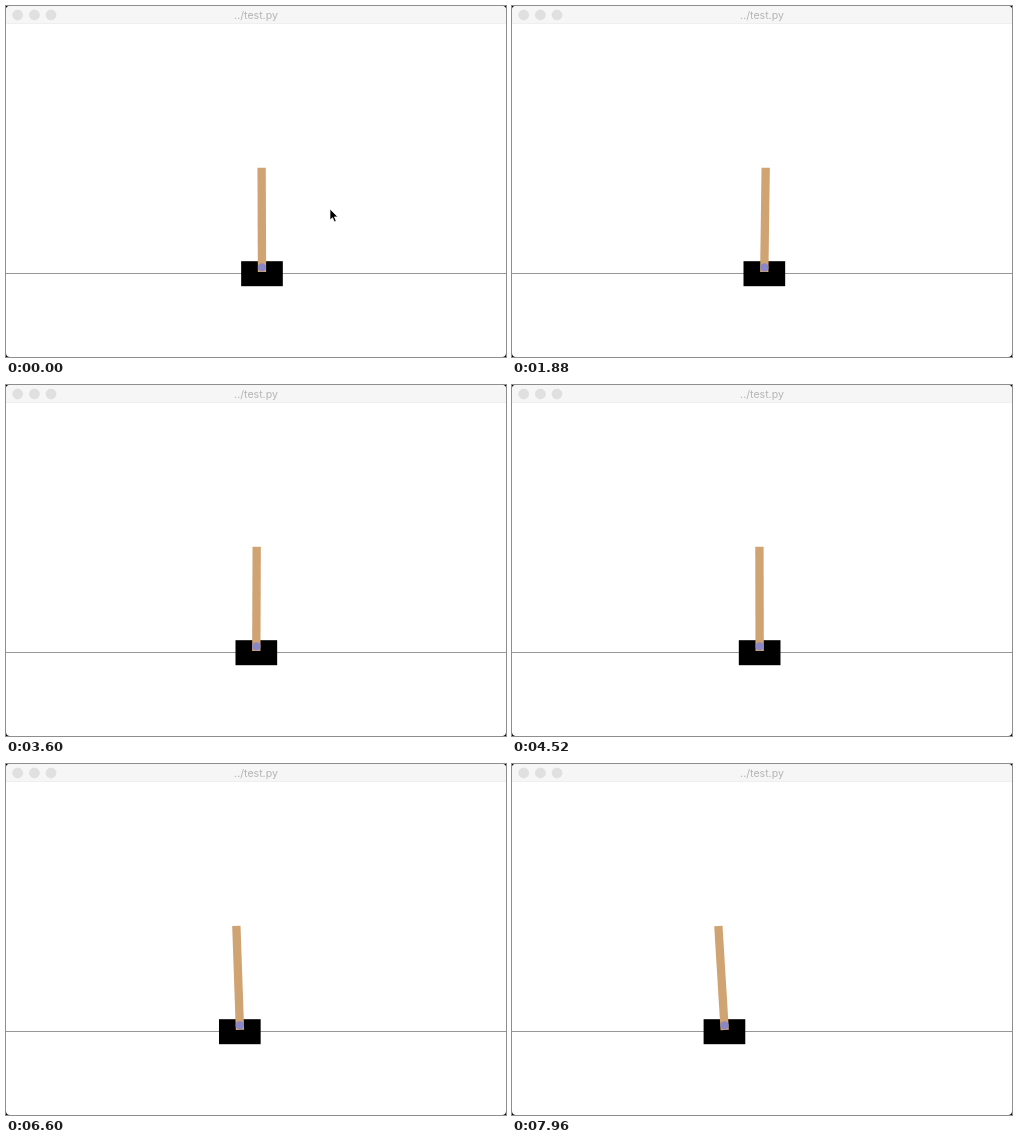
Write an HTML page that moves like this. It is 500 px wide and 351 px high and loops after 8 s.

```html
<!DOCTYPE html>
<html lang="en">
<head>
<meta charset="utf-8">
<style>
  html, body { margin: 0; width: 100%; height: 100%; overflow: hidden; background: #000; }
  svg { display: block; width: 500px; height: 351px; }
  .title { font: 10.6px Inter, sans-serif; fill: #b4b4b4; text-anchor: middle; }
</style>
</head>
<body>
<svg viewBox="0 0 500 351">
  <rect width="500" height="351" rx="4" fill="#fff"/>
  <path d="M0 18V4a4 4 0 0 1 4-4H496a4 4 0 0 1 4 4V18z" fill="#f6f6f6"/>
  <path d="M0 17.5H500" stroke="#efefef"/>
  <g fill="#e0e0e0" stroke="#d8d8d8" stroke-width=".5">
    <circle cx="11.7" cy="9" r="5"/>
    <circle cx="28.4" cy="9" r="5"/>
    <circle cx="45" cy="9" r="5"/>
  </g>
  <text class="title" x="250" y="13.3">../test.py</text>
  <path d="M0 267.5H500" stroke="#979797"/>
  <g id="cart">
    <rect x="-20.83" y="255.2" width="41.67" height="25"/>
    <g id="pole">
      <rect x="-4.17" y="-99.6" width="8.33" height="104.17" fill="#d0a372"/>
      <circle r="4.17" fill="#8a87c9"/>
    </g>
  </g>
  <path id="cursor" d="M324 203v11l2.5-2.3 1.8 4 1.9-.8-1.8-4h3.4z" stroke="#fff" stroke-width=".7"/>
</svg>
<script>
const LOOP = 8000, STEP = 40, POLE = 100, AXLE_Y = 261.4;
const [cart, pole, cursor] = ["cart", "pole", "cursor"].map(id => document.getElementById(id));

function draw(now) {
  const t = Math.floor(now % LOOP / STEP) * STEP;
  const s = t / LOOP;

  // The tip drifts left ever faster; the cart trails it and wobbles to keep balance
  const tip = 255.6 - 7.6 * s - 42.6 * s ** 4.2;
  const lean = 7.8 * s ** 2.3;
  const cycles = 0.22 + t / 860 - 0.9 * s ** 6;
  const offset = lean + 2 * Math.cos(2 * Math.PI * cycles);
  const angle = -Math.asin(offset / POLE) * 180 / Math.PI;

  cart.setAttribute("transform", `translate(${tip + offset} 0)`);
  pole.setAttribute("transform", `translate(0 ${AXLE_Y}) rotate(${angle})`);
  cursor.setAttribute("visibility", t < 120 ? "visible" : "hidden");
}

const start = performance.now();
function tick() {
  draw(performance.now() - start);
  requestAnimationFrame(tick);
}
tick();
</script>
</body>
</html>
```
